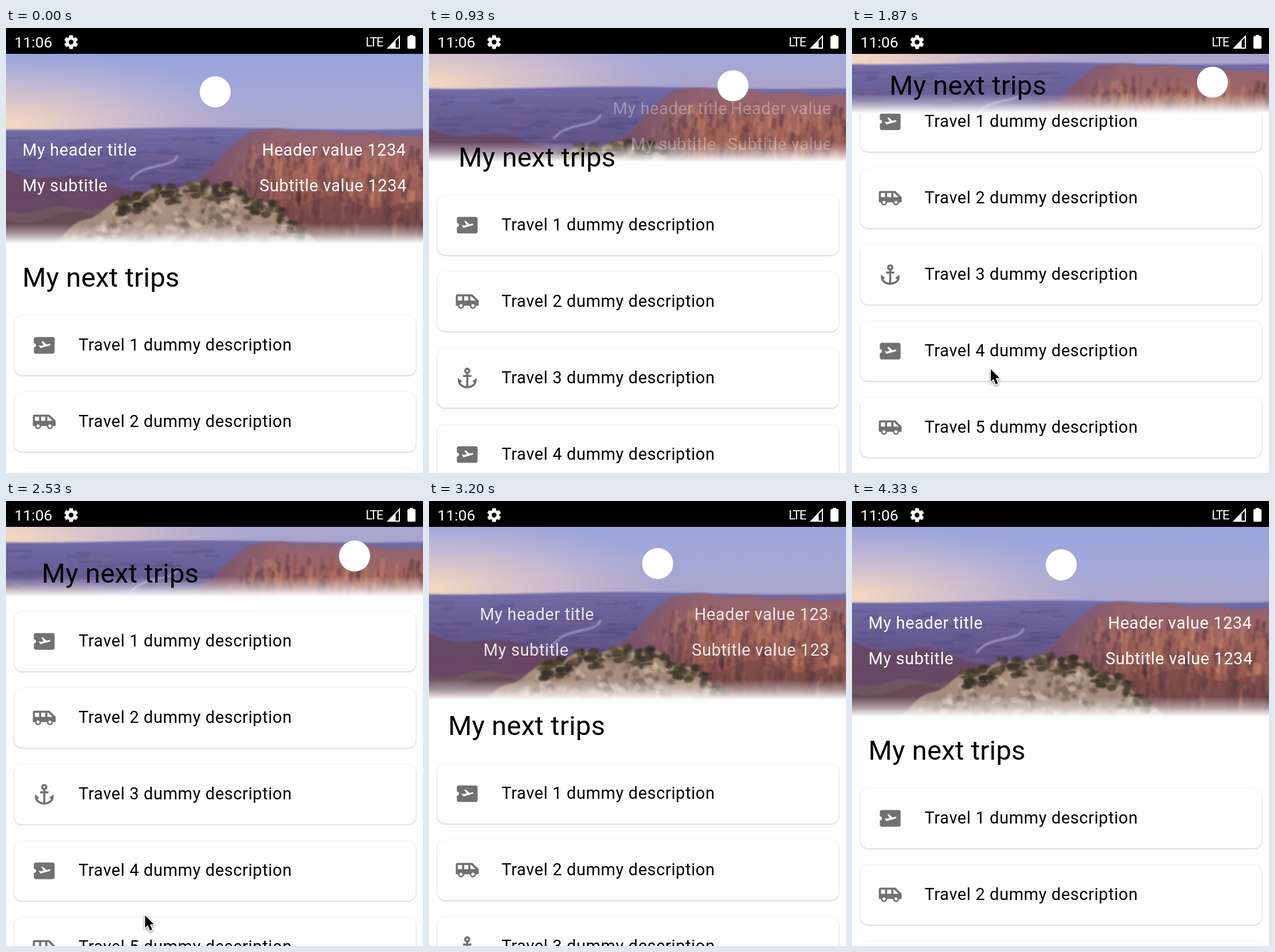
Animation, 724 px wide and 774 px high, one loop 4390 ms. Source, as an HTML page with a canvas:

```html
<!DOCTYPE html>
<html lang="en">
<head>
<meta charset="utf-8">
<title>My next trips</title>
<style>
html, body { margin: 0; width: 100%; height: 100%; overflow: hidden; background: #fdfdfd; }
canvas { display: block; width: 724px; height: 774px; }
</style>
</head>
<body>
<canvas id="stage" width="724" height="774"></canvas>
<script>
const W = 724, H = 774, LOOP = 4390, STEP = 200 / 3;
const BAR = 45, HEADER = 376;
const COLLAPSE = 334, LIST_END = 389, SLOP = 46;
const PAPER = '#fdfdfd', GREY = '#717171';
const stage = document.getElementById('stage').getContext('2d');

const ramp = (t, from, to) => Math.min(1, Math.max(0, (t - from) / (to - from)));

// The finger pushes up past the end of the list, rests, then pulls back down
function pose(t) {
  const up = 409 * ramp(t, 134, 1697);
  const down = (LIST_END + SLOP) * ramp(t, 2213, 3308);
  return {
    scroll: Math.min(LIST_END, up) - Math.max(0, down - SLOP),
    x: 230 + 11 * ramp(t, 1100, 1900),
    y: 1002 - up + down
  };
}

function poly(g, fill, ...pts) {
  g.beginPath();
  pts.forEach(([x, y]) => g.lineTo(x, y));
  g.closePath();
  g.fillStyle = fill;
  g.fill();
}

function disc(g, fill, x, y, rx, ry = rx) {
  g.beginPath();
  g.ellipse(x, y, rx, ry, 0, 0, 7);
  g.fillStyle = fill;
  g.fill();
}

function box(g, fill, x, y, w, h, r = 0) {
  g.beginPath();
  g.roundRect(x, y, w, h, r);
  g.fillStyle = fill;
  g.fill();
}

function gradient(g, x0, y0, x1, y1, ...colors) {
  const f = g.createLinearGradient(x0, y0, x1, y1);
  colors.forEach((c, i) => f.addColorStop(i / (colors.length - 1), c));
  return f;
}

function paintPhoto() {
  const c = document.createElement('canvas');
  c.width = W;
  c.height = HEADER - BAR;
  const g = c.getContext('2d');
  g.translate(0, -BAR);

  let seed = 11;
  const rnd = (a, b) => {
    seed = seed * 16807 % 2147483647;
    return a + (b - a) * seed / 2147483647;
  };
  const down = (...colors) => gradient(g, 0, 176, 0, HEADER, ...colors);
  const pick = (list, i) => list[i % list.length];

  // Fills everything under the outline y = f(x)
  function land(f, fill) {
    g.beginPath();
    g.moveTo(-9, 400);
    for (let x = -9; x <= W + 9; x += 3) g.lineTo(x, f(x));
    g.lineTo(W + 9, 400);
    g.fillStyle = fill;
    g.fill();
  }

  g.fillStyle = gradient(g, 0, BAR, 0, 176, '#9aa5dc', '#a2a7d8', '#aba5cc');
  g.fillRect(0, BAR, W, 140);
  g.save();
  g.translate(0, 166);
  g.scale(1, .28);
  const glow = g.createRadialGradient(0, 0, 20, 0, 0, 440);
  glow.addColorStop(0, 'rgba(246,217,192,.95)');
  glow.addColorStop(.5, 'rgba(222,200,205,.6)');
  glow.addColorStop(1, 'rgba(200,185,210,0)');
  g.fillStyle = glow;
  g.fillRect(0, -440, W, 500);
  g.restore();

  g.filter = 'blur(1.5px)';
  land(x => 175 + 2 * Math.sin(x / 90 + 1), down('#716ba6', '#62598f', '#66507c', '#674f66'));

  // Hazy strata, then the river
  for (let i = 0; i < 130; i++) {
    g.fillStyle = pick(['rgba(60,50,98,.22)', 'rgba(150,118,150,.2)'], i);
    g.fillRect(rnd(-30, 370), rnd(184, 300), rnd(15, 65), rnd(2, 5));
  }
  g.strokeStyle = '#a5a2ca';
  g.lineWidth = 3;
  g.beginPath();
  g.moveTo(298, 221);
  g.bezierCurveTo(292, 246, 240, 232, 216, 264);
  g.stroke();

  land(x => 246 + .14 * x + 7 * Math.sin(x / 28), 'rgba(104,70,96,.85)');
  land(x => 318 - .04 * x + 5 * Math.sin(x / 19), '#6f5560');

  // Red cliffs
  const cliff = x => 177 + .95 * Math.max(0, 425 - x) + .05 * Math.max(0, x - 480) + 2 * Math.sin(x / 13);
  land(cliff, down('#8f6272', '#a5675d', '#94594f', '#7d5050'));
  for (let i = 0; i < 300; i++) {
    const x = rnd(385, W), y = cliff(x) + rnd(16, 170), h = rnd(10, 42), w = rnd(3, 8);
    poly(g, pick(['rgba(62,36,54,.33)', 'rgba(214,148,115,.3)', 'rgba(110,62,60,.3)'], i),
      [x, y], [x + w, y + 2], [x + w - 2, y + h], [x - 3, y + h * .8]);
  }
  land(cliff, gradient(g, 345, 0, 470, 0, 'rgba(92,70,118,.65)', 'rgba(92,70,118,0)'));
  land(x => 300 + .06 * Math.abs(x - 560) + 8 * Math.sin(x / 24), 'rgba(92,58,66,.4)');

  // Foreground hill with rocks and shrubs
  const ridge = x => 272 + (x < 340 ? .0015 : .0026) * (x - 340) ** 2 + 4 * Math.sin(x / 11);
  land(ridge, down('#8a7468', '#8a7468', '#a8917f', '#9d867c'));
  for (let i = 0; i < 330; i++) {
    const x = rnd(80, 540), y = ridge(x) + rnd(6, 105), r = rnd(4, 13);
    poly(g, pick(['rgba(216,196,178,.5)', 'rgba(80,62,60,.42)', 'rgba(140,112,100,.4)'], i),
      [x, y], [x + r, y - 4], [x + r * 1.5, y + 4], [x + r * .4, y + 8]);
  }
  for (let i = 0; i < 150; i++) {
    const x = rnd(190, 515);
    disc(g, pick(['rgba(64,54,40,.8)', 'rgba(88,76,52,.75)', 'rgba(54,46,42,.75)'], i),
      x, ridge(x) + rnd(-5, 24), rnd(3, 10), rnd(2, 7));
  }
  return c;
}
const photo = paintPhoto();

// Icons live on a 24 unit grid
function ticket(g) {
  box(g, GREY, 2, 4, 20, 16, 2);
  disc(g, PAPER, 2, 12, 2);
  poly(g, PAPER, [6.5, 11.8], [8.8, 12.4], [17.5, 10.4], [17.8, 12], [8.3, 14.7]);
  poly(g, PAPER, [9.2, 8.2], [10.5, 7.9], [14.6, 11.6], [11.6, 12.2]);
}

function van(g) {
  poly(g, GREY, [1, 6], [2, 5], [17, 5], [23, 11], [23, 16], [1, 16]);
  [3, 9].forEach(x => box(g, PAPER, x, 7, 4, 4));
  poly(g, PAPER, [15, 7], [16, 7], [20, 11], [15, 11]);
  [6, 17.5].forEach(x => {
    disc(g, GREY, x, 16, 3);
    disc(g, PAPER, x, 16, 1.5);
  });
}

function anchor(g) {
  g.strokeStyle = GREY;
  g.lineWidth = 2;
  g.beginPath();
  g.arc(12, 5, 2, 0, 7);
  g.stroke();
  g.beginPath();
  g.ellipse(12, 14.6, 8, 6.3, 0, 0, Math.PI);
  g.stroke();
  box(g, GREY, 11, 7, 2, 14);
  box(g, GREY, 8, 9, 8, 2);
  [-1, 1].forEach(k => poly(g, GREY, [12 + 9 * k, 12], [12 + 5 * k, 15], [12 + 6.5 * k, 16.6], [12 + 9 * k, 15]));
}
const ICONS = [ticket, van, anchor];

function text(str, x, y, size = 28.8, color = '#fff', spacing = .64) {
  stage.font = `${size}px Roboto, sans-serif`;
  stage.letterSpacing = spacing + 'px';
  stage.fillStyle = color;
  stage.fillText(str, x, y);
}

function clipped(x, y, w, h, draw) {
  stage.save();
  stage.beginPath();
  stage.rect(x, y, w, h);
  stage.clip();
  draw();
  stage.restore();
}

function drawCard(i, y) {
  stage.save();
  stage.shadowColor = 'rgba(0,0,0,.22)';
  stage.shadowBlur = 3;
  stage.shadowOffsetY = 1;
  box(stage, PAPER, 14.5, y, 697, 104, 14);
  stage.restore();
  stage.save();
  stage.translate(44.8, y + 30.4);
  stage.scale(1.8, 1.8);
  ICONS[i % ICONS.length](stage);
  stage.restore();
  text(`Travel ${i + 1} dummy description`, 126, y + 61, 28.8, '#000');
}

function drawHeader(m, bottom) {
  clipped(0, BAR, W, bottom - BAR, () => {
    stage.drawImage(photo, 0, BAR - .34 * m);
    stage.fillStyle = gradient(stage, 0, bottom - 36, 0, bottom - 1, 'rgba(253,253,253,0)', 'rgba(253,253,253,.42)', PAPER);
    stage.fillRect(0, bottom - 36, W, 36);
  });

  const lift = .346 * m;
  stage.globalAlpha = Math.max(0, 1 - m / 309);
  clipped(0, BAR, 696, H, () => {
    text('My header title', 28.5 + 1.39 * m, 222 - lift);
    text('My subtitle', 28.5 + 1.54 * m, 284 - lift);
    text('Header value 1234', 444.5 + .377 * m, 222 - lift);
    text('Subtitle value 1234', 440 + .377 * m, 284 - lift);
  });
  stage.globalAlpha = 1;

  disc(stage, '#fff', 363.3 + .786 * m, 111 - .05 * m, 27);
  text('My next trips', 28.5 + .109 * m, 450 - m, 47, '#000', .25);
}

function drawStatusBar() {
  box(stage, '#000', 0, 0, W, BAR);
  text('11:06', 14.5, 34, 26.5, '#fff', 0);
  text('LTE', 624.5, 32, 22, '#fff', -1.8);

  stage.save();
  stage.translate(113, 24.5);
  for (let i = 0; i < 6; i++) {
    poly(stage, '#fff', [-3, -12], [3, -12], [4, -6], [-4, -6]);
    stage.rotate(Math.PI / 3);
  }
  disc(stage, '#fff', 0, 0, 9);
  disc(stage, '#000', 0, 0, 4.2);
  stage.restore();

  poly(stage, '#fff', [661, 36], [684, 12], [684, 36]);
  poly(stage, '#000', [676.5, 22.5], [682, 17], [682, 34], [676.5, 34]);
  box(stage, '#fff', 697, 14, 14, 22, 2);
  box(stage, '#fff', 701, 12, 6, 3);
}

function drawPointer(x, y) {
  const arrow = [[.5, .5], [.5, 22], [5.2, 17.6], [9, 26.8], [12.8, 25], [9, 16.2], [15.5, 15.8]];
  stage.save();
  stage.translate(x, y);
  stage.shadowColor = 'rgba(0,0,0,.35)';
  stage.shadowBlur = 4;
  stage.shadowOffsetY = 2;
  stage.lineWidth = 3;
  stage.strokeStyle = '#fff';
  poly(stage, '#fff', ...arrow);
  stage.stroke();
  stage.shadowColor = 'transparent';
  poly(stage, '#000', ...arrow);
  stage.restore();
}

function draw(ms) {
  // The picture advances 15 times a second
  const step = Math.min(65, Math.floor((ms % LOOP + 4) / STEP));
  const { scroll, x, y } = pose(step * STEP);
  const m = Math.min(scroll, COLLAPSE);
  const bottom = Math.round(HEADER - .68 * m);

  box(stage, PAPER, 0, 0, W, H);
  clipped(0, bottom, W, H - bottom, () => {
    for (let i = 0; i < 5; i++) drawCard(i, 500 - scroll + i * 133);
  });
  drawHeader(m, bottom);
  drawStatusBar();
  if (y < H) drawPointer(x, y);
}

const start = performance.now();
function tick() {
  draw(performance.now() - start);
  requestAnimationFrame(tick);
}
tick();
</script>
</body>
</html>
```
